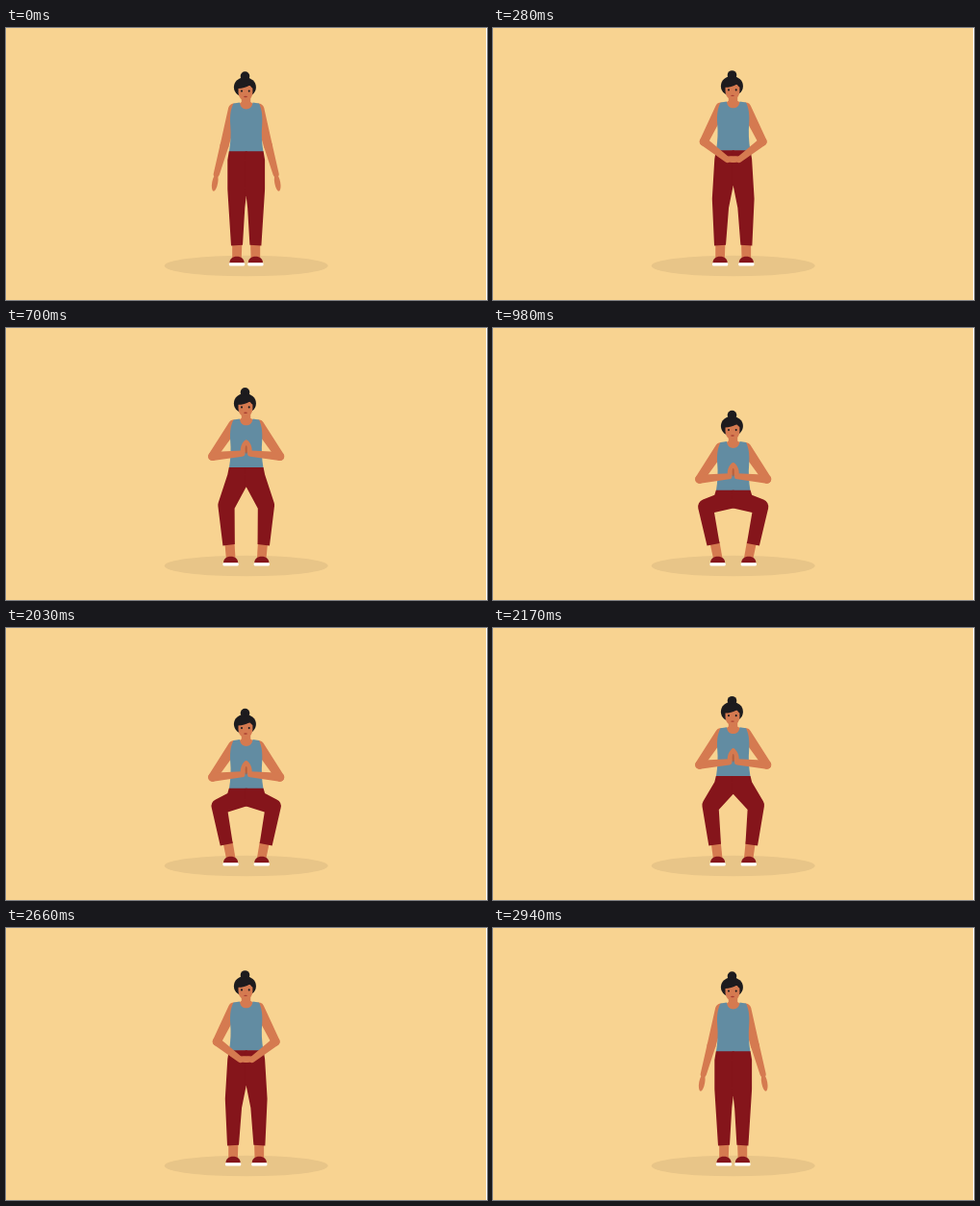
These frames come from a looping animation (500 by 283 pixels, 3.43 s). An HTML page with a canvas:

```html
<!DOCTYPE html>
<html lang="en">
<head>
<meta charset="utf-8">
<title>Squat</title>
<style>
html, body { margin: 0; width: 100%; height: 100%; overflow: hidden; background: #fff; }
canvas { display: block; }
</style>
</head>
<body>
<canvas id="stage" width="499" height="283"></canvas>
<script>
const ctx = document.getElementById('stage').getContext('2d');
const LOOP = 3430, STEP = 70, MID = 249.7;
const SKIN = '#d57a50', SHADE = '#b5613f', HAIR = '#1d1b1e', TOP = '#628ca2', PANTS = '#85151b';

const mix = (a, b, k) => a + (b - a) * k;
const ease = (t, from, to) => {
  const p = Math.min(1, Math.max(0, (t - from) / (to - from)));
  return (1 - Math.cos(Math.PI * p)) / 2;
};
const polar = (x, y, length, degrees) => {
  const a = degrees * Math.PI / 180;
  return [x + length * Math.cos(a), y + length * Math.sin(a)];
};

function shape(color, draw) {
  ctx.fillStyle = color;
  ctx.beginPath();
  draw(ctx);
  ctx.fill();
}

const oval = (color, x, y, rx, ry, turn = 0) =>
  shape(color, c => c.ellipse(x, y, rx, ry, turn, 0, Math.PI * 2));

// Tapered limb with round ends
function limb(x1, y1, r1, x2, y2, r2) {
  const a = Math.atan2(y2 - y1, x2 - x1), n = Math.PI / 2;
  shape(SKIN, c => {
    c.arc(x1, y1, r1, a + n, a - n);
    c.arc(x2, y2, r2, a - n, a + n);
  });
}

// Draws a left-side part and its mirror image
function bothSides(part) {
  part();
  ctx.save();
  ctx.translate(MID * 2, 0);
  ctx.scale(-1, 1);
  part();
  ctx.restore();
}

function foot(ready, squat) {
  const x = 240 - 6.4 * ready;
  const cuff = 240 - 6.5 * ready - 4.5 * squat;
  shape(SKIN, c => {
    c.moveTo(cuff - 4.8 + squat, 222);
    c.lineTo(cuff + 5.4 + squat, 222);
    c.lineTo(x + 4.8, 239);
    c.lineTo(x - 4.8, 239);
  });
  shape(PANTS, c => {
    c.moveTo(x - 7.6, 244.5);
    c.bezierCurveTo(x - 7.6, 240, x - 4.5, 237.7, x, 237.7);
    c.bezierCurveTo(x + 4.5, 237.7, x + 7.6, 240, x + 7.6, 244.5);
  });
  shape('#fff', c => c.roundRect(x - 8.2, 244.2, 16.4, 3.4, [1, 1, 1.5, 1.5]));
}

function leg(ready, squat, dy) {
  const waist = 128.3 + dy;
  const kneeX = 230.3 - 4.1 * ready - 14.5 * squat;
  const kneeY = 168 + 16 * ready - 3 * squat * squat;
  const crotch = 175 - 16 * ready - 12 * (1 - (1 - squat) ** 4) + dy;
  const cuffOut = 234 - 6.5 * ready - 5 * squat;
  const cuffIn = 246 - 6.5 * ready - 4 * squat;
  shape(PANTS, c => {
    c.moveTo(MID + 1, waist);
    c.lineTo(231.8, waist);
    c.lineTo(230.3, waist + mix(9, 5, squat));
    c.arcTo(kneeX, kneeY, cuffOut, 226.5, mix(40, 8, ready));
    c.lineTo(cuffOut, 226.5);
    c.lineTo(cuffIn, 225.8 - 1.8 * squat);
    c.lineTo(248.3 - 5.3 * ready - 13 * squat, 187 + 5 * squat * squat);
    c.lineTo(MID, crotch);
    c.lineTo(MID + 1, crotch);
  });
}

const elbowAt = (ready, dy) => polar(236.7, 84.3 + dy, 39.2, mix(104.3, 124.2, ready));

function upperArm(ready, dy) {
  limb(236.7, 84.3 + dy, 5.7, ...elbowAt(ready, dy), 4.5);
}

function forearm(ready, dy) {
  const [x, y] = elbowAt(ready, dy);
  const turn = mix(100, -70, ready), half = mix(9, 7.4, ready);
  const [wx, wy] = polar(x, y, 30.8, mix(105.5, -5.5, ready));
  limb(x, y, 4.5, wx, wy, 3.1);
  oval(SKIN, ...polar(wx, wy, half, turn), half, mix(3, 3.5, ready), turn * Math.PI / 180);
}

function torso() {
  shape(TOP, c => {
    c.moveTo(236.5, 78.6);
    c.lineTo(243, 77.6);
    c.bezierCurveTo(243.5, 86.8, 256, 86.8, 256.5, 77.6);
    c.lineTo(263, 78.6);
    c.bezierCurveTo(265.5, 84, 266.9, 90, 266.2, 101);
    c.quadraticCurveTo(265, 114, 267.5, 129);
    c.lineTo(231.9, 129);
    c.quadraticCurveTo(234.4, 114, 233.2, 101);
    c.bezierCurveTo(232.5, 90, 233.8, 84, 236.5, 78.6);
  });
}

function neck() {
  shape(SKIN, c => {
    c.moveTo(244.8, 68);
    c.lineTo(254.2, 68);
    c.lineTo(254.2, 77);
    c.lineTo(258, 79.5);
    c.lineTo(255, 87);
    c.lineTo(244.5, 87);
    c.lineTo(241.5, 79.5);
    c.lineTo(244.8, 77);
  });
}

function head() {
  oval(HAIR, 248.5, 50.1, 4.8, 4.8);
  oval(HAIR, 248.4, 61.6, 11.5, 10.4);
  shape(SKIN, c => {
    c.moveTo(241.5, 60);
    c.lineTo(256.4, 60);
    c.lineTo(256.4, 67);
    c.bezierCurveTo(256.2, 72.5, 252.5, 75.8, 249, 75.8);
    c.bezierCurveTo(245.3, 75.8, 241.8, 72.5, 241.5, 67);
  });
  shape(HAIR, c => {
    c.moveTo(239, 64.5);
    c.quadraticCurveTo(240, 53, 249, 53);
    c.quadraticCurveTo(257.5, 53, 258, 63.5);
    c.quadraticCurveTo(255, 62.5, 253.4, 59.6);
    c.quadraticCurveTo(248, 63, 241, 63);
  });
  oval(HAIR, 245, 65.6, 1, 1.1);
  oval(HAIR, 252.7, 65.6, 1, 1.1);
  oval('#a63c30', 249, 71.5, 1.9, 0.7);
}

function draw(t) {
  const ready = ease(t, 0, 490) - ease(t, 2450, 2940);
  const squat = ease(t, 470, 986) - ease(t, 1957, 2470);
  const dy = 40.5 * squat - 1.2 * Math.sin(Math.PI * ready);

  ctx.fillStyle = '#f8d391';
  ctx.fillRect(0, 0, 500, 283);
  oval('#e8c588', MID, 247.5, 85, 10.8);

  bothSides(() => foot(ready, squat));
  bothSides(() => upperArm(ready, dy));
  ctx.save();
  ctx.translate(0, dy);
  neck();
  torso();
  head();
  ctx.restore();
  bothSides(() => leg(ready, squat, dy));
  bothSides(() => forearm(ready, dy));
  if (ready > 0.9) oval(SHADE, MID, 109.7 + dy, 1, 4.2);
}

function tick() {
  draw(Math.floor(performance.now() % LOOP / STEP) * STEP);
  requestAnimationFrame(tick);
}
tick();
</script>
</body>
</html>
```
